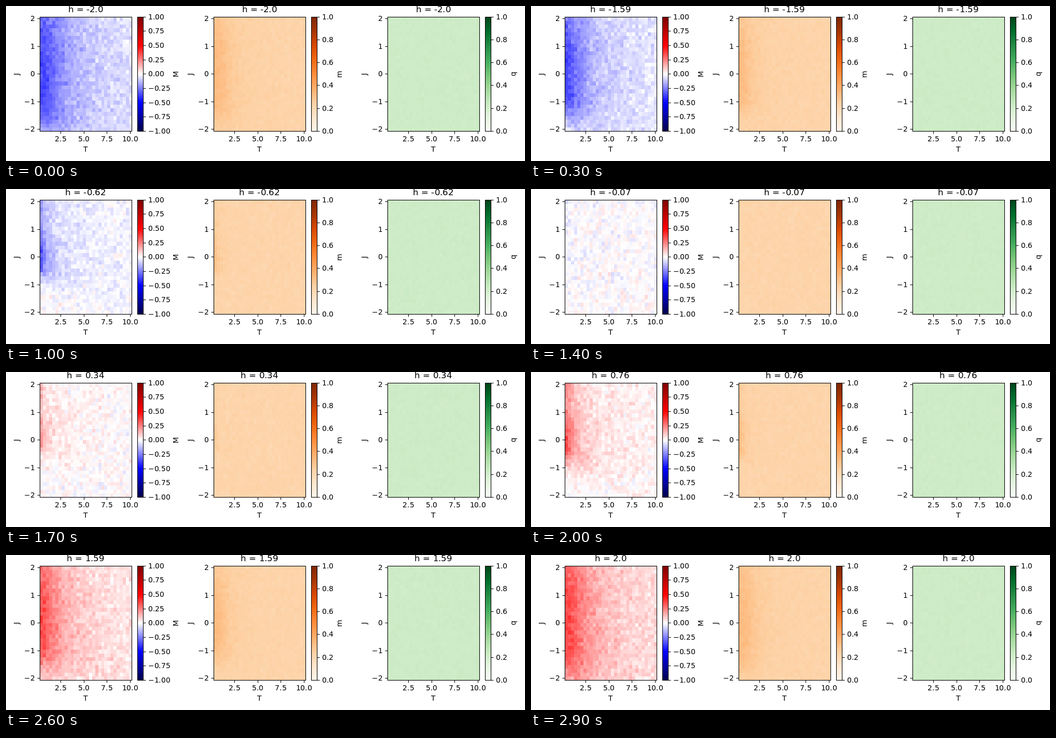
An HTML page with a canvas for the animation above (3 s loop, 1000 by 300 pixels).

```html
<!DOCTYPE html>
<html>
<head>
<meta charset="utf-8">
<style>
html, body { margin: 0; width: 100%; height: 100%; overflow: hidden; background: #fff; }
canvas { display: block; }
</style>
</head>
<body>
<canvas id="stage" width="1000" height="300"></canvas>
<script>
const ctx = document.getElementById('stage').getContext('2d');
const N = 30, STEP = 100;
const TOP = 21.25, W = 177, H = 221, BOTTOM = TOP + H, BAR = 11;

const ramp = text => text.split(' ').map(hex =>
  [0, 2, 4].map(i => parseInt(hex.slice(i, i + 2), 16)));

const panels = [
  { x: 65.5, label: 'M', min: -1, tick: 0.25, digits: 2, labelX: 332,
    stops: ramp('00004c 0000ff ffffff ff0000 800000') },
  { x: 400.5, label: 'm', min: 0, tick: 0.2, digits: 1, labelX: 647,
    stops: ramp('fff5eb fee6ce fdd0a2 fdae6b fd8d3c f16913 d94801 a63603 7f2704') },
  { x: 735.5, label: 'q', min: 0, tick: 0.2, digits: 1, labelX: 982,
    stops: ramp('f7fcf5 e5f5e0 c7e9c0 a1d99b 74c476 41ab5d 238b45 006d2c 00441b') }
];

function color(stops, u) {
  const p = Math.min(Math.max(u, 0), 1) * (stops.length - 1);
  const i = Math.min(Math.floor(p), stops.length - 2);
  const mix = stops[i].map((c, k) => Math.round(c + (stops[i + 1][k] - c) * (p - i)));
  return `rgb(${mix})`;
}

function random(seed) {
  return () => {
    seed = seed + 0x6D2B79F5 | 0;
    let t = Math.imul(seed ^ seed >>> 15, 1 | seed);
    t = t + Math.imul(t ^ t >>> 7, 61 | t) ^ t;
    return ((t ^ t >>> 14) >>> 0) / 4294967296;
  };
}

// Mean magnetisation of a spin lattice at temperature T, coupling J, field h
function magnetisation(T, J, h) {
  const a = Math.abs(h), v = Math.abs(J) / (a + 0.18 * T);
  const order = J < 0 ? 1 / (1 + (v / 0.95) ** 5) : 1 - 0.4 * v ** 3 / (1 + v ** 3);
  return Math.sign(h) * 0.36 * Math.tanh(0.9 * a / T) * order;
}

function cells(panel, index, h, seed) {
  const rnd = random(seed);
  const noise = () => 2 * (rnd() + rnd() + rnd() - 1.5);
  const px = i => Math.round(panel.x + i * W / N);
  const py = j => Math.round(BOTTOM - j * H / N);
  for (let j = 0; j < N; j++) {
    for (let i = 0; i < N; i++) {
      const M = magnetisation(0.4 + 9.6 * i / (N - 1), -2 + 4 * j / (N - 1), h);
      const u = [
        (M + 0.028 * noise() + 1) / 2,
        0.225 + 0.8 * M * M + 0.009 * noise(),
        0.224 + 0.006 * noise()
      ][index];
      ctx.fillStyle = color(panel.stops, u);
      ctx.fillRect(px(i), py(j + 1), px(i + 1) - px(i), py(j) - py(j + 1));
    }
  }
}

const setFont = size => ctx.font = `${size}px "DejaVu Sans", sans-serif`;

// Places every glyph on a whole pixel; align is 0 left, 0.5 centre, 1 right
function text(str, x, y, align = 0.5, size = 13.89) {
  setFont(100);
  const width = s => ctx.measureText(s).width * size / 100;
  const left = x - align * width(str);
  const places = [...str].map((c, i) => Math.round(left + width(str.slice(0, i))));
  setFont(size);
  [...str].forEach((c, i) => ctx.fillText(c, places[i], Math.round(y)));
}

function upright(str, x) {
  ctx.save();
  ctx.translate(x, 132);
  ctx.rotate(-Math.PI / 2);
  text(str, 0, 0);
  ctx.restore();
}

function line(x, y, dx, dy) {
  ctx.beginPath();
  ctx.moveTo(x, y);
  ctx.lineTo(x + dx, y + dy);
  ctx.stroke();
}

const snap = v => Math.floor(v) + 0.5;
const signed = (v, digits) => v.toFixed(digits).replace('-', '\u2212');

function axes(panel, title) {
  const { x, min, tick, digits, stops } = panel;
  const mid = x + 88, bar = x + 188, top = snap(TOP);

  const fill = ctx.createLinearGradient(0, BOTTOM, 0, TOP);
  stops.forEach((c, i) => fill.addColorStop(i / (stops.length - 1), `rgb(${c})`));
  ctx.fillStyle = fill;
  ctx.fillRect(bar, top, BAR, H);

  ctx.fillStyle = ctx.strokeStyle = '#000';
  ctx.lineWidth = 1.1;
  ctx.strokeRect(x, top, W, H);
  ctx.strokeRect(bar, top, BAR, H);

  for (let T = 2.5; T <= 10; T += 2.5) {
    const tx = x + 40 + (T - 2.5) * 17.8;
    line(snap(tx), top + H, 0, 5);
    text(T.toFixed(1), tx, 262);
  }
  for (let J = -2; J <= 2; J++) {
    const y = TOP + H / 2 - J * 53.4;
    line(x, snap(y), -5, 0);
    text(signed(J, 0), x - 9.7, y + 4.5, 1);
  }
  const count = Math.round((1 - min) / tick);
  for (let k = 0; k <= count; k++) {
    const y = BOTTOM - H * k / count;
    line(bar + BAR, snap(y), 5, 0);
    text(signed(min + k * tick, digits), bar + BAR + 9.5, y + 4.5, 0);
  }

  text(title, mid, 12, 0.5, 16.67);
  text('T', mid, 282);
  upright('J', x - 40.5);
  upright(panel.label, panel.labelX);
}

function draw(step) {
  const h = -2 + 4 * step / (N - 1);
  const value = Math.round(h * 100) / 100;
  const title = 'h = ' + (Number.isInteger(value) ? value.toFixed(1) : value);
  ctx.fillStyle = '#fff';
  ctx.fillRect(0, 0, 1000, 300);
  panels.forEach((panel, i) => {
    cells(panel, i, h, 1000 * step + 77 * i + 5);
    axes(panel, title);
  });
}

const start = performance.now();
let shown = -1;
function tick() {
  const step = Math.floor(Math.max(0, performance.now() - start) / STEP) % N;
  if (step !== shown) draw(shown = step);
  requestAnimationFrame(tick);
}
tick();
</script>
</body>
</html>
```
